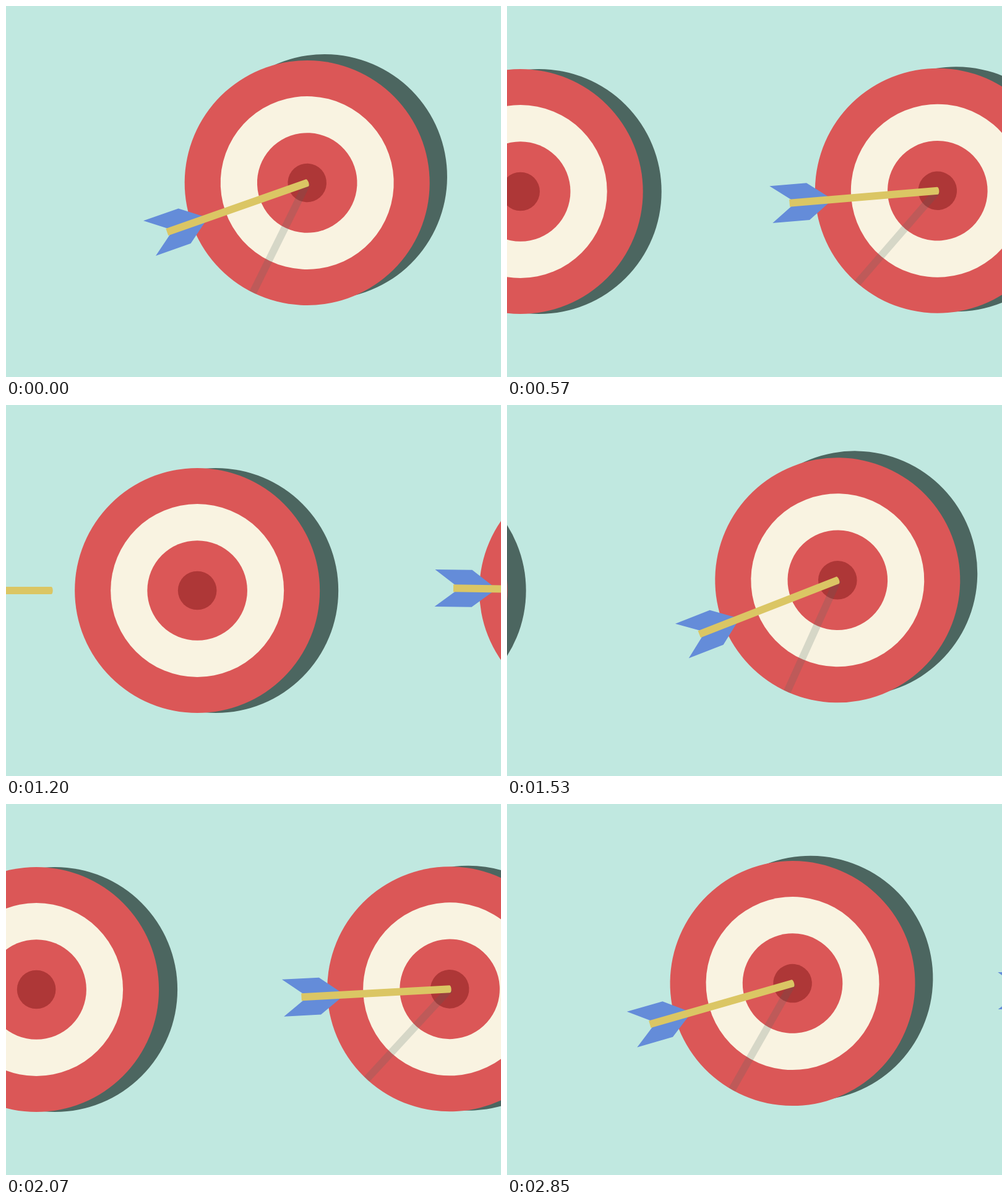
Animation of 800 by 600 pixels, one loop 2880 ms. Source, as an HTML page with a canvas:

```html
<!DOCTYPE html>
<html lang="en">
<head>
<meta charset="utf-8">
<title>Targets</title>
<style>
html, body { margin: 0; height: 100%; overflow: hidden; background: #c0e8e0; }
canvas { display: block; }
</style>
</head>
<body>
<canvas id="stage" width="800" height="600"></canvas>
<script>
const ctx = document.getElementById('stage').getContext('2d');
const PERIOD = 1440;   // ms between two targets
const SPEED = 657 / PERIOD;
const HIT = 1260;      // age of a target when the arrow lands
const FLIGHT = 90;
const SWING = 21.8;
const PIVOT = { x: 7, y: 206 };   // from the hinge to the bullseye
const DEG = Math.PI / 180;

function disc(x, r, color) {
  ctx.fillStyle = color;
  ctx.beginPath();
  ctx.arc(x, 0, r, 0, 7);
  ctx.fill();
}

// Swing angle in degrees, u ms after the hit
function swing(u) {
  if (u <= 0) return 0;
  if (u < 240) {
    const k = Math.min(1, u / 228);
    return -SWING * k * k * (3 - 2 * k);
  }
  if (u < 420) {
    const k = (u - 240) / 180;
    return -SWING * (1 - k * k * (0.29 + 2.51 * k - 1.8 * k * k));
  }
  const s = (u - 420) / 900;
  return 10 * Math.sin(4 * Math.PI * s) * Math.exp(-2 * s);
}

function drawShadow(shift) {
  ctx.save();
  ctx.beginPath();
  ctx.arc(0, 0, 198, 0, 7);
  ctx.clip();
  ctx.rotate(-44.3 * DEG);
  ctx.fillStyle = 'rgba(75, 103, 98, 0.2)';
  ctx.fillRect(shift - 240, -6, 240, 12);
  ctx.restore();
}

function drawArrow(shift) {
  ctx.save();
  ctx.translate(shift, 0);
  ctx.fillStyle = '#648cd9';
  ctx.beginPath();
  for (const [x, y] of [[-270, -30], [-210, -30], [-170, 0], [-210, 30], [-270, 30], [-230, 0]]) {
    ctx.lineTo(x, y);
  }
  ctx.fill();
  ctx.fillStyle = '#dbc664';
  ctx.beginPath();
  ctx.moveTo(-240, -6);
  ctx.lineTo(0, -6);
  ctx.ellipse(0, 0, 2.5, 6, 0, -Math.PI / 2, Math.PI / 2);
  ctx.lineTo(-240, 6);
  ctx.fill();
  ctx.restore();
}

function drawTarget(age) {
  const u = age - HIT;
  ctx.save();
  ctx.translate(SPEED * age - 238.8 - PIVOT.x, 300 - PIVOT.y);
  ctx.rotate(swing(u) * DEG);
  ctx.translate(PIVOT.x, PIVOT.y);
  disc(30, 198, '#4c6660');
  disc(0, 198, '#db5757');
  disc(0, 140, '#f9f3e1');
  disc(0, 80.8, '#db5757');
  disc(0, 31.3, '#ae3737');
  if (u > -FLIGHT) {
    const shift = Math.min(0, u * 4);
    drawShadow(shift);
    drawArrow(shift);
  }
  ctx.restore();
}

function frame() {
  const t = performance.now() % PERIOD;
  ctx.fillStyle = '#c0e8e0';
  ctx.fillRect(0, 0, 800, 600);
  drawTarget(t + PERIOD);
  drawTarget(t);
  requestAnimationFrame(frame);
}
frame();
</script>
</body>
</html>
```
